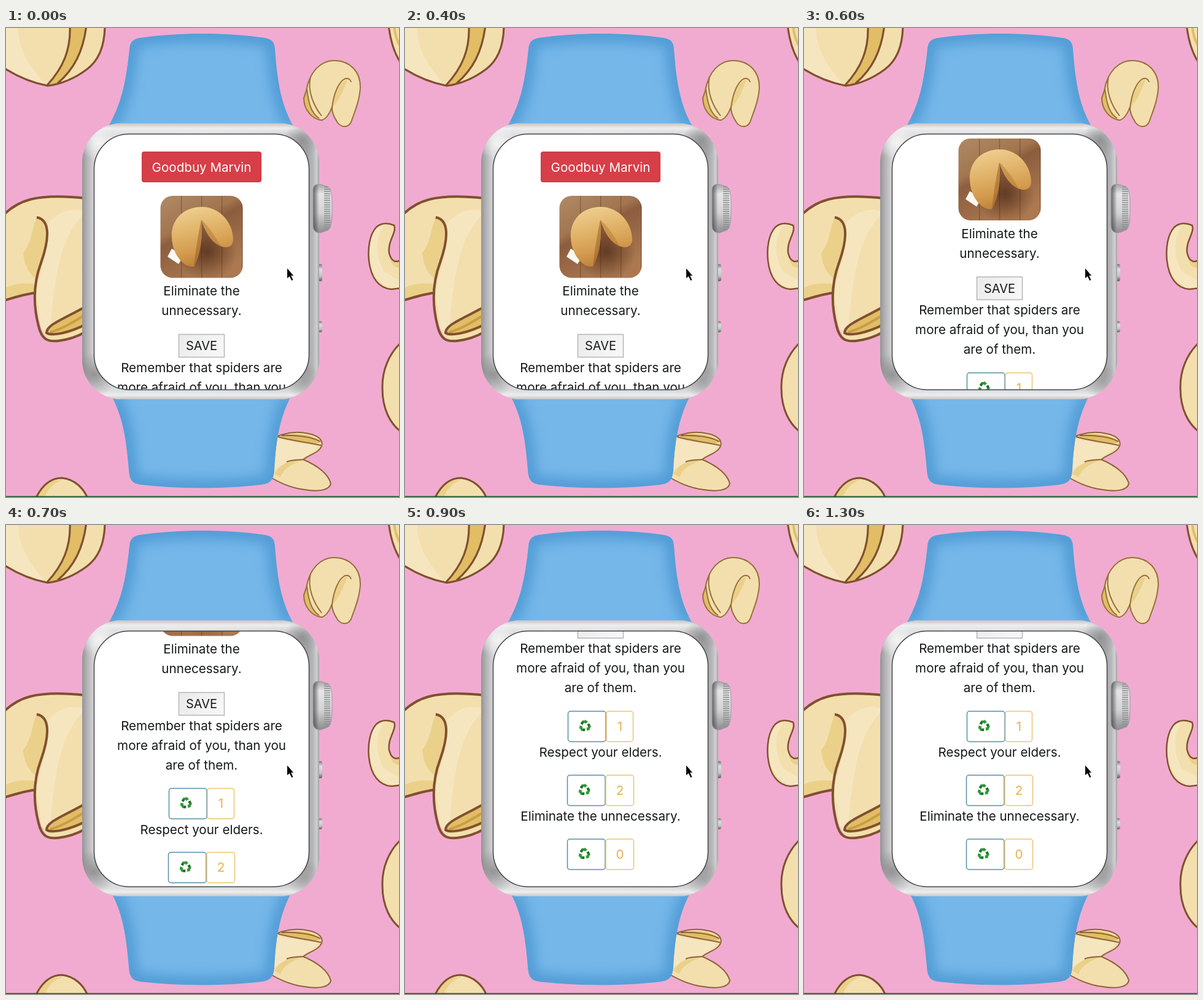
Recreate the animation shown at these times as an HTML page with a canvas. Size 640x763 px, loop 1.4 s.

```html
<!DOCTYPE html>
<html lang="en">
<head>
<meta charset="utf-8">
<title>Fortune watch</title>
<style>
  html, body { margin: 0; width: 100%; height: 100%; overflow: hidden; background: #f1abd0; }
  canvas { display: block; width: 640px; height: 763px; }
</style>
</head>
<body>
<canvas id="stage" width="640" height="763"></canvas>
<script>
const ctx = document.getElementById('stage').getContext('2d');
const FONT = 'Inter, "Liberation Sans", sans-serif';
const INK = '#16181b';
const CREAM = '#f3dfae', PALE = '#f6e6c0', TAN = '#ebd08a', GOLD = '#e1bd66', BROWN = '#80502f';
const STEP = 100, STEPS = 14, END = 351.5;
const scrollAt = { 5: 5.5, 6: 93.5, 7: 226, 8: 319 };

function shape(d, fill, stroke, width = 2) {
  const p = new Path2D(d);
  if (fill) { ctx.fillStyle = fill; ctx.fill(p); }
  if (stroke) { ctx.strokeStyle = stroke; ctx.lineWidth = width; ctx.stroke(p); }
}

function box(x, y, w, h, r, fill, stroke, width = 1.5) {
  ctx.beginPath();
  ctx.roundRect(x, y, w, h, r);
  if (fill) { ctx.fillStyle = fill; ctx.fill(); }
  if (stroke) { ctx.strokeStyle = stroke; ctx.lineWidth = width; ctx.stroke(); }
}

function linear(x0, y0, x1, y1, ...stops) {
  const g = ctx.createLinearGradient(x0, y0, x1, y1);
  stops.forEach(([at, color]) => g.addColorStop(at, color));
  return g;
}

function radial(x, y, r, ...stops) {
  const g = ctx.createRadialGradient(x, y, 0, x, y, r);
  stops.forEach(([at, color]) => g.addColorStop(at, color));
  return g;
}

// y is the middle of the capitals
function label(str, y, color = INK, x = 318.5, size = 20.6) {
  ctx.font = `${size}px ${FONT}`;
  ctx.textAlign = 'center';
  ctx.fillStyle = color;
  ctx.fillText(str, x, y + size * 0.364);
}

function clipped(d, draw) {
  ctx.save();
  ctx.clip(new Path2D(d));
  draw();
  ctx.restore();
}

function cookies() {
  // top left
  const a = 'M-5 -5H161C161 28 152 52 132 67C112 82 91 91 68 94C41 89 18 79 -5 64Z';
  clipped(a, () => {
    shape(a, CREAM);
    shape('M-5 -5H20C18 25 30 55 66 94L-5 80Z', PALE);
    shape('M104 -5C106 35 93 65 66 96L84 91C110 68 126 36 131 -5Z', GOLD);
  });
  shape(a + 'M104 -5C106 35 93 65 67 93M131 -5C126 38 111 67 84 90', null, BROWN, 3.2);

  // left
  const b = 'M-5 305C18 282 45 268 130 277V495C108 506 92 509 74 509C58 503 51 478 47 431C30 433 14 438 -5 444Z';
  clipped(b, () => {
    shape(b, CREAM);
    shape('M130 300C98 328 80 375 72 494L58 490L50 430C55 400 73 350 68 318C85 298 110 290 130 300Z', PALE);
    shape('M50 309C72 315 69 348 49 408C38 400 30 388 28 366C42 350 42 325 50 309Z', TAN);
    shape('M-5 425C15 414 29 415 48 416V433L-5 444Z', TAN);
    shape('M66 499C66 490 78 482 130 453V485C105 497 85 503 66 499Z', GOLD);
    shape('M72 495C93 489 110 478 130 466', null, '#c99d45', 4);
  });
  shape('M-5 305C18 282 45 268 130 277M50 308C72 312 71 342 57 382C45 414 44 450 53 485C58 506 67 511 85 509C101 507 115 503 130 494'
    + 'M-5 444C14 438 30 433 47 431M130 453C91 475 66 483 66 496C75 502 105 495 130 482', null, BROWN, 4);

  // upper right
  const c = 'M489 102C494 72 512 52 536 53C561 54 577 71 577 96C576 119 567 138 562 153C557 163 546 162 540 154C534 145 530 137 531 128C526 142 521 148 514 150C497 148 485 132 485 114Z';
  shape(c, CREAM);
  shape('M489 101C496 130 500 143 514 149C495 147 484 130 485 113Z', GOLD);
  shape('M556 84C542 87 533 106 531 130C538 124 549 105 556 84Z', TAN);
  shape(c + 'M531 129C534 105 542 88 551 83C557 80 561 84 562 88M490 99C493 127 499 140 510 147M496 79C490 103 502 128 514 143', null, '#967039', 2);

  // right
  const d = 'M632 321C622 317 611 317 603 324C592 336 589 358 591 378C594 407 608 424 628 425L645 423V375C636 384 627 380 624 366C621 347 637 332 632 321Z';
  shape(d, CREAM);
  shape('M615 322C600 343 602 375 616 397L645 413V423C613 428 593 403 592 365C591 339 600 323 615 322Z', PALE);
  shape('M624 366C626 383 637 383 645 375V390C633 392 626 386 624 366Z', TAN);
  shape(d, null, BROWN, 2.5);
  const e = 'M645 510C623 530 612 558 613 587C613 620 626 645 645 658Z';
  shape(e, CREAM, BROWN, 3);
  shape('M623 -5C626 22 632 42 645 60V-5Z', CREAM, BROWN, 3);
  shape('M632 -5C633 10 637 23 645 34', null, GOLD, 4);

  // bottom
  const f = 'M425 673C449 658 472 655 493 660C509 663 517 671 514 680C510 691 494 694 484 702C505 711 524 724 529 741C527 752 509 755 486 751C461 748 443 738 425 728Z';
  shape(f, CREAM);
  shape('M440 668C465 674 492 678 507 679C504 690 491 693 480 702C462 706 448 709 435 721Z', PALE);
  shape('M445 664C468 657 505 661 511 675C495 678 470 671 445 664Z', GOLD);
  shape('M437 725C448 707 467 701 483 703C460 712 452 718 447 731Z', TAN);
  shape(f + 'M443 665C466 672 493 674 513 679M484 702C475 703 465 702 457 706M449 663C471 662 500 665 512 673', null, '#8d6236', 2);
  const g = 'M47 768C58 744 73 732 91 732C111 734 127 748 134 768Z';
  shape(g, CREAM);
  shape('M53 753C65 738 77 735 92 735C75 741 66 753 62 768H47Z', TAN);
  shape(g, null, BROWN, 3);
}

function band(edge) {
  shape(edge + 'Z', '#75b7e9');
  clipped(edge + 'Z', () => {
    ctx.filter = 'blur(10px)';
    shape(edge, null, '#4f9ad4', 26);
    ctx.filter = 'none';
  });
}

function barrel() {
  const d = 'M500 264C500 255 506 253 514 255L524 258C530 261 531 274 531 293C531 313 530 326 524 329L513 333C504 334 500 329 500 321Z';
  shape(d, linear(0, 254, 0, 333, [0, '#a3a3a5'], [.2, '#e6e6e7'], [.6, '#d3d3d5'], [1, '#8c8c8e']));
  clipped(d, () => {
    for (let y = 258; y < 330; y += 3.6) box(518, y, 10, 1.6, 0, '#8e8f91');
    ctx.fillStyle = linear(499, 0, 510, 0, [0, 'rgba(70,70,72,.9)'], [1, 'rgba(70,70,72,0)']);
    ctx.fillRect(499, 254, 11, 80);
  });
  shape(d, null, '#9b9b9d', 1);
}

function watch() {
  [[384, 28], [477, 18]].forEach(([y, h]) =>
    box(508, y, 7, h, 3, linear(0, y, 0, y + h, [0, '#77787a'], [.3, '#dededf'], [.7, '#c4c4c6'], [1, '#5d5e60'])));

  box(124, 155, 386, 449, 64, linear(124, 0, 510, 0,
    [0, '#949496'], [.02, '#b2b2b4'], [.05, '#d5d5d7'], [.5, '#dededf'], [.95, '#a4a5a7'], [.975, '#b8b8ba'], [.99, '#d0d0d2'], [1, '#a0a0a2']));
  ctx.save();
  ctx.clip();
  ctx.fillStyle = linear(0, 155, 0, 604, [0, '#c4c4c6'], [.018, '#eeeeef'], [.045, 'rgba(225,225,227,.6)'], [.12, 'rgba(220,220,222,0)'],
    [.9, 'rgba(220,220,222,0)'], [.965, 'rgba(220,220,222,.8)'], [.985, '#ededee'], [1, '#c6c6c8']);
  ctx.fillRect(124, 155, 386, 449);
  [[152, 187, 30, '255,255,255'], [482, 183, 30, '125,125,127'], [144, 564, 36, '120,120,122'], [485, 574, 30, '150,150,152']]
    .forEach(([x, y, r, c]) => {
      ctx.fillStyle = radial(x, y, r, [0, `rgba(${c},.7)`], [1, `rgba(${c},0)`]);
      ctx.fillRect(x - r, y - r, 2 * r, 2 * r);
    });
  ctx.restore();
  barrel();
  box(143.5, 172.5, 350, 416, 57, '#fff');
}

function cookieIcon() {
  ctx.save();
  ctx.beginPath();
  ctx.roundRect(251.5, 273, 134, 133.5, 20);
  ctx.clip();
  ctx.fillStyle = linear(251, 273, 320, 407, [0, '#b08a66'], [.4, '#a1754f'], [.5, '#8c5d3e'], [1, '#ab7850']);
  ctx.fillRect(251, 273, 135, 134);
  for (let x = 285; x < 386; x += 33) box(x, 273, 1.2, 134, 0, 'rgba(92,53,30,.5)');
  ctx.fillStyle = radial(328, 364, 48, [0, 'rgba(60,28,12,.6)'], [1, 'rgba(60,28,12,0)']);
  ctx.fillRect(251, 300, 135, 107);
  shape('M270 359L289 371L281 384L263 372Z', '#fbf8f2');
  shape('M270 341C268 313 288 291 319 291C347 291 369 315 370 343C370 356 361 359 350 355C336 350 325 334 318 312C322 340 315 374 306 388C291 391 271 370 270 341Z',
    linear(300, 290, 325, 388, [0, '#f0d092'], [.35, '#e2b76e'], [.7, '#d49c4f'], [1, '#bb7e36']));
  shape('M318 312C322 340 315 374 306 388C309 360 313 335 318 312Z', 'rgba(150,90,35,.5)');
  shape('M318 312C325 334 336 350 350 355C341 340 330 322 318 312Z', 'rgba(170,105,40,.4)');
  ctx.restore();
}

function recycle(x, y) {
  for (let i = 0; i < 3; i++) {
    ctx.save();
    ctx.translate(x, y);
    ctx.rotate(i * Math.PI * 2 / 3);
    shape('M-5.5 -3L-3 -7H1', null, '#2f9637', 4);
    shape('M.5 -10.5L5 -6.8L.5 -3.2Z', '#2f9637');
    shape('M-5.5 -3L-3.5 -6.2', null, '#1d7328', 4);
    ctx.restore();
  }
}

function votes(y, count, left, right) {
  box(left + .5, y + .5, 61.5, 49.5, 4, '#fff', '#568fa7');
  box(left + 63, y + .5, right - left - 63.5, 49.5, 4, '#fff', '#edc56d');
  recycle(left + 28, y + 24.5);
  label(count, y + 25, '#e9b04a', 350);
}

function content() {
  box(221, 201, 195, 50, 4, '#d73e48');
  box(221.5, 201.5, 194, 49, 4, null, '#c23a43', 1);
  label('Goodbuy Marvin', 227, '#fff');
  cookieIcon();
  label('Eliminate the', 428);
  label('unnecessary.', 460);
  box(281.5, 498.5, 74, 37, 0, linear(281, 498, 356, 536, [0, '#ebebeb'], [1, '#f8f8f8']), '#b5b5b5');
  label('SAVE', 517, INK, 318.5, 20);
  label('Remember that spiders are', 552.5);
  label('more afraid of you, than you', 584.5);
  label('are of them.', 616.5);
  votes(654, '1', 265, 372);
  label('Respect your elders.', 721.5);
  votes(758, '2', 264, 373);
  label('Eliminate the unnecessary.', 825.5);
  votes(862, '0', 264, 373);
}

function draw(scroll) {
  ctx.fillStyle = '#f1abd0';
  ctx.fillRect(0, 0, 640, 763);
  cookies();
  band('M168 158C186 126 195 94 201 35C202 22 207 18 219 16C281 7 360 7 420 16C433 18 437 22 438 35C442 91 449 126 467 158');
  band('M172 599C190 632 196 668 200 718C201 735 205 741 220 743C283 750 354 750 415 743C431 741 436 735 437 718C440 665 447 632 464 599');
  watch();
  ctx.save();
  ctx.beginPath();
  ctx.roundRect(143.5, 172.5, 350, 416, 57);
  ctx.clip();
  ctx.translate(0, -scroll);
  content();
  ctx.restore();
  box(143.5, 172.5, 350, 416, 57, null, '#444547', 1.5);
  shape('M457.5 390V408L461.5 404.5L465 411.5L468 410L464.8 403.2H469Z', '#000', '#fff', 1);
  ctx.fillStyle = '#125c25';
  ctx.fillRect(0, 761.5, 640, 1.5);
}

let shown = -1;
const start = performance.now();
function tick() {
  const step = Math.floor((performance.now() - start) / STEP) % STEPS;
  if (step !== shown) {
    shown = step;
    draw(step < 5 ? 0 : scrollAt[step] ?? END);
  }
  requestAnimationFrame(tick);
}
tick();
</script>
</body>
</html>
```
